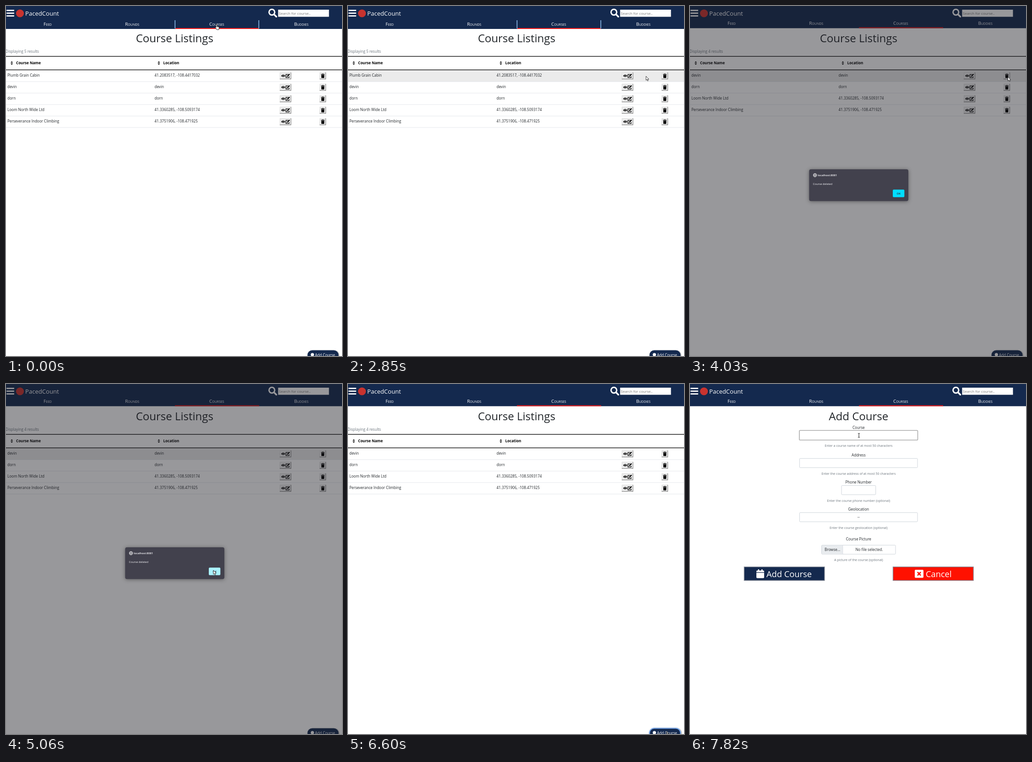
These frames come from a looping animation (734x763 px, 8000 ms). An HTML page:

```html
<!DOCTYPE html>
<html lang="en">
<head>
<meta charset="utf-8">
<title>Course Listings</title>
<style>
html, body { margin: 0; height: 100%; overflow: hidden; background: #fff; }
svg { display: block; font: 8.1px 'Open Sans', 'Noto Sans', sans-serif; white-space: pre; }
.tab { font-size: 9.8px; font-variant: small-caps; }
.pill { filter: drop-shadow(1px 1.5px 1.5px #0007); }
.dialog { filter: drop-shadow(0 1px 4px #0006); }
</style>
</head>
<body>
<svg id="stage" width="734" height="763" viewBox="0 0 734 763"></svg>
<script>
const LOOP = 8000, NAVY = '#14294e', INK = '#212529', MUTED = '#6c757d', RED = '#ff1100';
const stage = document.getElementById('stage');

const courses = [
  ['Plumb Grain Cabin', '41.2083517, -108.4417032'],
  ['devin', 'devin'],
  ['dorn', 'dorn'],
  ['Loom North Wide Ltd', '41.3360285, -108.5093174'],
  ['Perseverance Indoor Climbing', '41.3751906, -108.471925'],
];

// Pointer travel: start time, end time, steps, destination
const start = [460, 39.5];
const moves = [
  [800, 1760, 8, 225, 138],
  [1880, 2850, 8, 651, 153],
  [2980, 3220, 3, 694.5, 154.5],
  [4340, 5060, 6, 453, 406],
  [5640, 6460, 7, 697, 757],
  [7010, 7820, 7, 369, 112],
];

const within = (t, a, b) => t >= a && t < b;
const rect = (x, y, w, h, fill, more = '') =>
  `<rect x="${x}" y="${y}" width="${w}" height="${h}" fill="${fill}" ${more}/>`;
const path = (d, fill, more = '') => `<path d="${d}" fill="${fill}" ${more}/>`;
const text = (x, y, s, fill = INK, size = 8.1, more = '') =>
  `<text x="${x}" y="${y}" fill="${fill}" font-size="${size}" ${more}>${s}</text>`;
const centred = (y, s, fill, size) => text(368.3, y, s, fill, size, 'text-anchor="middle"');
const at = (x, y, body) => `<g transform="translate(${x} ${y})">${body}</g>`;

function pointer(t) {
  let [x, y] = start;
  for (const [from, to, n, tx, ty] of moves) {
    if (t < from) break;
    const step = Math.min(n, Math.floor((t - from) / (to - from) * (n - 1) + 1e-6) + 1);
    const u = step / n, e = u * u * (3 - 2 * u);
    x += (tx - x) * e;
    y += (ty - y) * e;
  }
  return [x, y];
}

function header(hover) {
  const bottom = hover ? 50 : 48.4, inset = hover ? 1 : 0;
  let s = rect(0, 0, 734, bottom, NAVY);
  for (const y of [8.3, 14.3, 20.3]) s += rect(1, y, 17, 2.6, '#fff', 'rx=".8"');
  s += '<circle cx="30.5" cy="16" r="8.6" fill="#c8332f"/>';
  s += text(42, 21, 'PacedCount', '#fff', 13.1);
  s += '<circle cx="580.8" cy="13.5" r="6.2" fill="none" stroke="#fff" stroke-width="3"/>';
  s += path('M585.5 18.2l5 5', 'none', 'stroke="#fff" stroke-width="3.6" stroke-linecap="round"');
  s += rect(594.5, 8, 111, 15.5, '#fff') + text(596, 19, 'Search for course..', '#757575', 8);
  ['Feed', 'Rounds', 'Courses', 'Buddies'].forEach((name, i) => {
    s += `<text class="tab" x="${91 + i * 184.7}" y="${bottom - 7}" fill="#fff" text-anchor="middle">${name}</text>`;
  });
  s += rect(369 + inset, bottom - 2, 184 - 2 * inset, 2, '#f01818');
  if (hover) s += [368.5, 551.5].map(x => rect(x, 31, 1.6, 18, '#8fbfee')).join('');
  return s;
}

function button(w, h, focus, pressed) {
  if (focus) {
    return rect(-.5, -.5, w + .5, h + .5, pressed ? '#b9cdee' : '#efefef',
      'rx="1" stroke="#72a5f2" stroke-width="1.6"');
  }
  return rect(0, 0, w, h, '#ededed') +
    path(`M.5 ${h}V.5H${w}`, 'none', 'stroke="#dcdcdc"') +
    path(`M0 ${h - .5}H${w - .5}V0`, 'none', 'stroke="#858585" stroke-width="1.2"');
}

const eye = path('M3 7.5Q7.5 1.8 12.2 7.5Q7.5 13.2 3 7.5z', '#000') +
  '<circle cx="7.6" cy="7.5" r="1.9" fill="none" stroke="#eee" stroke-width=".8"/>';
const pencil = path('M18.5 4.5H13.5V11.5H20.5V8.5', 'none', 'stroke="#000" stroke-width="1.3"') +
  path('M15.5 9.7l.4-2 4.8-4.8 1.6 1.6-4.8 4.8z', '#000');
const bin = path('M3.2 3.6H5.6L6.1 2.9H8.1L8.6 3.6H11V4.8H3.2zM3.7 5.5H10.5L10.1 12.3H4.1z', '#000');
const sortIcon = path('M0 3L2.6 0 5.2 3zM0 4.6H5.2L2.6 7.6z', '#000');

function listing(rows, focus, hover, pillFocus) {
  const shift = focus ? 1 : 0, col = 324.5 - shift;
  let s = centred(79, 'Course Listings', INK, 24);
  s += text(-1, 102, `Displaying ${rows.length} results`, MUTED);
  s += rect(0, 109, 734, 1.4, '#111') + rect(0, 138.6, 734, 1.4, '#111');
  s += at(10, 120.6, sortIcon) + text(22, 127, 'Course Name', '#000', 8.05, 'font-weight="700"');
  s += at(331.3 - shift, 120.6, sortIcon) +
    text(343.5 - shift, 127, 'Location', '#000', 8.05, 'font-weight="700"');
  rows.forEach(([name, place], i) => {
    const y = 140 + i * 25 + (i ? shift : 0), h = i ? 25 : 25 + shift;
    const lit = !i && hover, focused = !i && focus;
    if (lit) s += rect(0, y, 734, h, '#ebebeb');
    s += rect(0, y + h - .5, 734, .8, '#dee2e6');
    s += text(3, y + 14, name) + text(col, y + 14, place);
    s += at(598 - 2 * shift, y + 4.7, button(25, 15, false) + eye + pencil);
    s += at(685 - 2 * shift, y + 4.7, button(14, 15, focused, lit) + bin);
  });
  s += rect(658.5, 750.5, 68, 21, NAVY,
    `class="pill" rx="10.5" ${pillFocus ? 'stroke="#78a9ee" stroke-width="2"' : ''}`);
  s += '<circle cx="669.3" cy="760" r="3.6" fill="#fff"/>' + text(675, 763.5, 'Add Course', '#fff');
  return s;
}

function field(label, y, x, w, help, active) {
  const grow = active ? .5 : 0;
  return centred(y - 4, label) +
    rect(x - grow, y - grow, w + 2 * grow, 20 + 2 * grow, '#fff',
      `rx="1.5" stroke="${active ? '#aaa' : '#ced4da'}" stroke-width="${active ? 1.6 : 1}"`) +
    centred(y + 35.5, help, MUTED, 7);
}

function bigButton(x, fill, label, labelX, icon) {
  return rect(x, 398.7, 175.6, 29.6, fill, 'stroke="#858b96" stroke-width="1.4"') +
    text(labelX, 420.7, label, '#fff', 18.3) + icon;
}

function form(active) {
  const calendar = path('M145 408.5q0-2 2-2h1.5V404h2.5v2.5h5V404h2.5v2.5h1.5q2 0 2 2v1.8h-17z' +
    'M145 411.6h17v9.6q0 2-2 2h-13q-2 0-2-2z', '#fff');
  const cross = rect(491, 405, 19, 17.5, '#fff', 'rx="2"') +
    path('M497 410l7 7.4M504 410l-7 7.4', 'none', `stroke="${RED}" stroke-width="2.7"`);
  return centred(79, 'Add Course', INK, 24) +
    field('Course', 101.7, 239.3, 257.7, 'Enter a course name of at most 50 characters', active) +
    field('Address', 162.3, 239.3, 257.7, 'Enter the course address of at most 50 characters') +
    field('Phone Number', 221.3, 331, 74.7, 'Enter the course phone number (optional)') +
    field('Geolocation', 280.3, 239.3, 257.7, 'Enter the course geolocation (optional)') +
    centred(292.5, '--') +
    centred(341, 'Course Picture') +
    rect(287.5, 351.3, 161.5, 19.7, '#fff', 'rx="1.5" stroke="#ced4da"') +
    rect(288, 351.8, 45.7, 18.7, '#e9ecef') + rect(333.5, 351.3, .7, 19.7, '#ced4da') +
    text(294, 364, 'Browse...') + text(361.5, 364, 'No file selected.') +
    centred(386, 'A picture of the course (optional)', MUTED, 7) +
    bigButton(118.3, NAVY, 'Add Course', 167, calendar) +
    bigButton(443.5, RED, 'Cancel', 515, cross);
}

function dialog(hot) {
  const globe = '<g fill="none" stroke="#fff" stroke-width=".8"><circle cx="273" cy="368.8" r="3.7"/>' +
    '<ellipse cx="273" cy="368.8" rx="1.7" ry="3.7"/><path d="M269.3 368.8h7.4"/></g>';
  return rect(0, 0, 734, 763, '#1c1b22', 'opacity=".45"') +
    rect(260.3, 356, 216.7, 69.3, '#42414d', 'class="dialog" rx="4"') + globe +
    text(279, 371.2, 'localhost:8081', '#fbfbfe', 6.1, 'font-weight="600"') +
    text(268.5, 389.7, 'Course deleted', '#fbfbfe', 6) +
    rect(443, 400.3, 25.3, 16.5, hot ? '#aaf2ff' : '#00ddff', 'rx="2"') +
    text(455.7, 410.8, 'OK', '#2b2a33', 6, 'text-anchor="middle" font-weight="600"');
}

const cursors = {
  arrow: path('M0 0V8.8L2 7 3.4 10.3 4.9 9.7 3.5 6.5H6.2z', '#fff', 'stroke="#111" stroke-width=".8"'),
  hand: path('M-1 7V1.2a1 1 0 0 1 2 0V4.6l3.6.8q1.2.3 1 1.6l-.6 3.4v1.8H.2v-1.4L-3.2 7.6q.5-1.5 2.2-.6z' +
    'M1 4.6V6.8M2.8 5V6.8M4.5 5.4V7', '#fff', 'stroke="#111" stroke-width=".8"'),
  beam: path('M-2-4.5Q0-4.5 0-3.5Q0-4.5 2-4.5M0-3.5V3.5M-2 4.5Q0 4.5 0 3.5Q0 4.5 2 4.5', 'none',
    'stroke="#111"'),
};

function scene(t) {
  const [x, y] = pointer(t);
  const onForm = t >= 6720, asking = within(t, 4030, 5210);
  const typing = onForm && y < 122;
  const focus = within(t, 3600, 4030) || within(t, 5210, 6460);
  const hand = t < 800 || within(t, 3220, 3740) || within(t, 5210, 5640) || within(t, 6460, 6720);
  const rows = t < 3740 ? courses : courses.slice(1);

  return header(t < 3740) +
    (onForm ? form(typing) : listing(rows, focus, y > 140 && t < 5210, t >= 6460)) +
    (asking ? dialog(x < 468) : '') +
    at(x, y, cursors[typing ? 'beam' : hand ? 'hand' : 'arrow']);
}

let shown = '';
function draw() {
  const next = scene(performance.now() % LOOP);
  if (next !== shown) stage.innerHTML = shown = next;
  requestAnimationFrame(draw);
}
draw();
</script>
</body>
</html>
```
